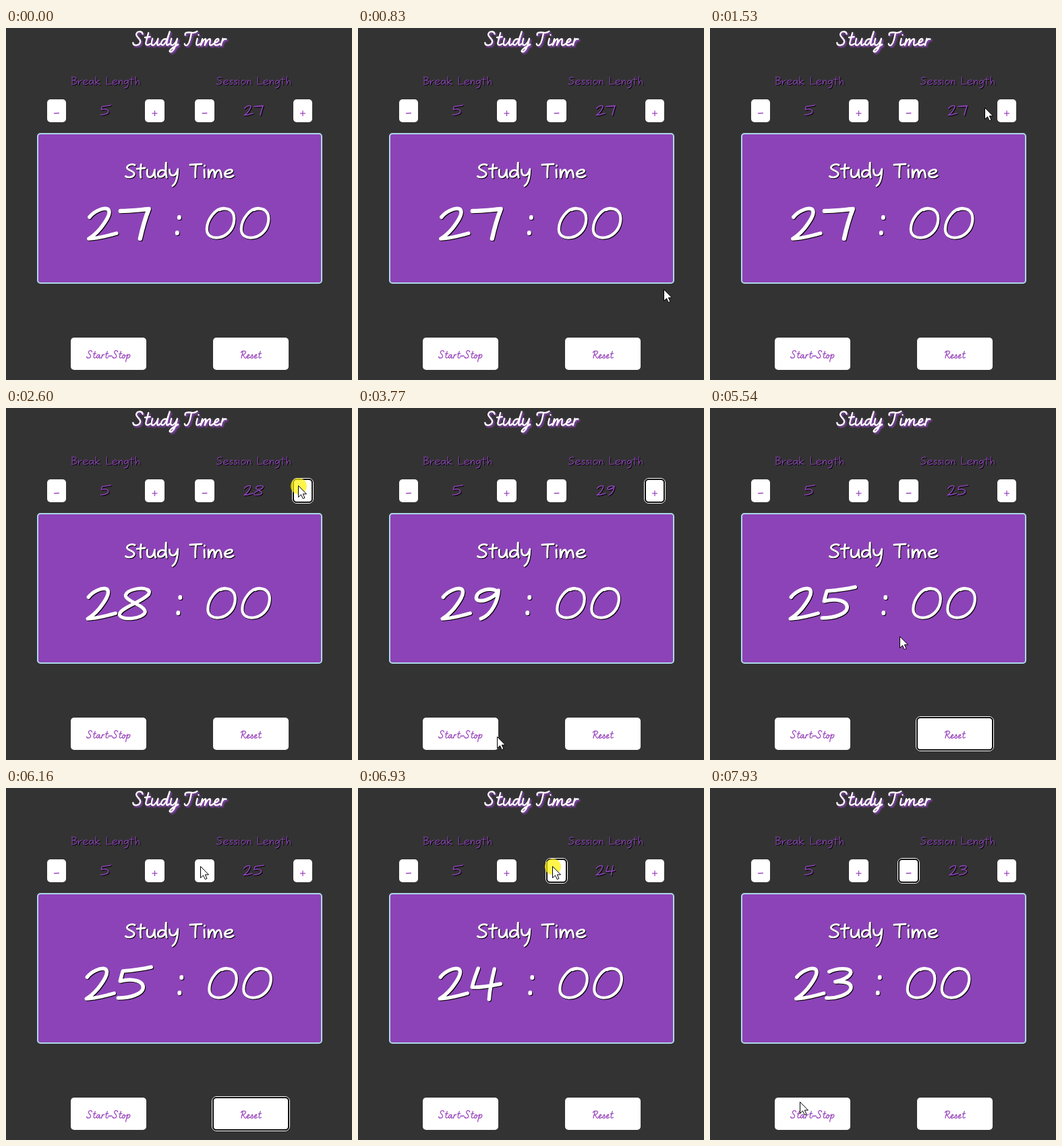
Write an HTML page that moves like this. It is 513 px wide and 523 px high and loops after 8 s.

```html
<!DOCTYPE html>
<html lang="en">
<head>
<meta charset="utf-8">
<title>Study Timer</title>
<style>
  html, body { margin: 0; width: 100%; height: 100%; overflow: hidden; background: #333; }
  svg { display: block; width: 513px; height: 523px; }
  .pen { fill: none; stroke-linecap: round; stroke-linejoin: round; }
  .pen text { fill: transparent; stroke: none; font-family: "Open Sans", sans-serif; text-anchor: middle; }
  .hard { filter: drop-shadow(1px 1px 0 #000); }
  .glow { filter: drop-shadow(2px 2px 1px #8c43b7); }
</style>
</head>
<body>
<svg id="stage" viewBox="0 0 513 523">
  <rect width="513" height="523" fill="#333"/>
  <rect x="47" y="157" width="421" height="222" rx="4" fill="#8c43b7" stroke="#add8e6" stroke-width="2"/>
  <g id="fixed"></g>
  <g id="minutes"></g>
  <g id="clock"></g>
  <g id="ring" fill="none"></g>
  <circle id="press" r="12" fill="#fff000" opacity=".7"/>
  <path id="cursor" d="M-.5 -.5V16.5L3.5 12.8L6.3 18.7L9 17.5L6.3 11.8H11.5Z" fill="#fff" stroke="#000"/>
</svg>
<script>
const PURPLE = '#8c43b7';
const $ = id => document.getElementById(id);

// Pen strokes per letter: [advance, path, relative weight]; capitals run from y 0 to the baseline at 50.
const hand = {
  ' ': [30, ''],
  ':': [13, 'M8 16v1M5 39v1', 1.4],
  0: [51, 'M30 3C16 1 3 20 3 34C3 54 38 50 43 24C46 8 36 0 22 5'],
  2: [46, 'M4 16C10 8 24 1 31 4C38 9 27 24 20 33C14 40 8 45 3 48C16 48 30 44 44 40', 1.3],
  3: [40, 'M6 8C18 2 38 2 38 9C37 16 24 21 15 23C30 22 40 25 38 33C35 42 16 48 2 47', 1.3],
  4: [53, 'M14 3C10 14 6 24 5 31C18 32 32 29 47 26M38 4C34 20 31 34 30 49', 1.3],
  5: [57, 'M53 1C40 4 24 6 11 7C9 13 8 18 7 22C26 17 42 22 41 32C40 41 22 47 4 47', 1.3],
  7: [50, 'M4 7C16 7 34 5 46 4C42 14 37 30 33 48', 1.5],
  8: [53, 'M46 6C40 0 16 4 13 13C12 22 42 28 42 38C40 48 6 52 4 42C4 32 36 24 47 12C49 8 48 6 46 5', 1.2],
  9: [45, 'M39 8C28 0 8 6 7 17C8 27 34 19 40 6C39 22 30 42 14 48', 1.3],
  B: [38, 'M7 4L6 48M3 5C20 0 34 6 30 14C26 21 16 22 8 24C24 22 36 28 33 37C28 46 16 48 5 48'],
  L: [34, 'M6 3C5 20 4 34 5 47C14 48 22 47 32 45'],
  S: [39, 'M34 6C22 0 6 8 8 16C10 25 34 26 32 37C29 48 10 50 3 44'],
  T: [43, 'M2 5L41 3M22 4C20 20 19 34 20 48'],
  a: [36, 'M27 26C16 18 4 28 4 38C6 52 24 46 28 26C27 36 28 44 33 48'],
  d: [39, 'M28 26C16 18 4 28 4 38C6 52 26 46 30 28C31 18 31 8 31-2C29 18 30 36 33 48'],
  e: [38, 'M5 36C20 36 32 30 30 24C25 18 6 24 5 36C6 50 24 50 34 42'],
  g: [34, 'M27 26C16 18 4 28 4 36C6 48 24 44 28 24C30 50 26 72 4 68'],
  h: [34, 'M6 0L6 48C8 34 14 24 20 25C28 27 27 38 28 48'],
  i: [16, 'M7 22L8 48M8 8v1'],
  k: [36, 'M6 2L6 48M28 22L8 36L32 48'],
  m: [55, 'M5 22L6 48C8 32 14 22 20 22C26 24 26 36 26 47C28 32 34 22 41 23C48 26 48 38 49 48'],
  n: [33, 'M5 22L6 48C8 32 14 22 20 22C28 24 27 38 28 48'],
  o: [34, 'M18 22C6 22 2 36 6 44C14 52 30 44 30 32C30 24 22 20 14 24'],
  r: [28, 'M5 22L6 48C6 34 14 22 25 24'],
  s: [26, 'M23 24C12 20 4 26 8 31C14 35 24 36 21 42C17 49 8 48 3 45'],
  t: [33, 'M16 4C14 20 12 36 15 48M2 19L29 16'],
  u: [36, 'M4 22C2 40 4 48 14 47C22 46 28 34 29 22C28 34 28 42 32 48'],
  y: [41, 'M4 22C4 38 10 44 20 40C26 36 30 28 32 20C32 44 26 70 14 76']
};

const script = {
  ' ': [18, ''],
  '-': [24, 'M1 36L23 35', 1.2],
  '+': [34, 'M5 36h24M17 24v24'],
  R: [38, 'M16 8L6 49M4 14C8 2 34 0 34 12C32 22 22 26 14 27C22 30 24 48 30 49C34 49 36 47 38 44'],
  S: [38, 'M36 10C34-2 16 0 14 12C14 22 30 26 28 38C24 52 4 52 3 40'],
  T: [40, 'M6 14C4 4 14 4 24 5C34 7 42 6 47 1M28 6C24 22 22 44 12 49C8 50 4 48 4 44'],
  a: [31, 'M22 29C10 22 2 38 4 45C8 54 18 42 23 28C20 38 18 48 23 49C26 49 29 46 31 44'],
  d: [32, 'M22 28C10 24 2 38 4 45C8 54 20 42 24 28L33 2C28 20 20 42 23 48C26 51 30 46 32 44'],
  e: [23, 'M5 40C14 38 20 32 17 27C12 24 4 34 3 42C4 52 14 50 23 44'],
  i: [17, 'M8 26C5 36 2 48 7 49C10 49 14 47 17 44M12 13v1'],
  m: [46, 'M8 27L2 49C8 36 14 26 19 27C22 30 18 40 16 49C22 36 28 26 34 27C38 30 30 46 35 49C39 50 42 47 46 44'],
  o: [26, 'M14 27C4 28 0 44 6 49C16 52 22 36 16 28C14 34 20 36 26 32'],
  p: [30, 'M9 24L-2 72M6 40C12 28 22 22 25 30C26 40 18 50 8 48'],
  r: [22, 'M3 49L9 26M6 38C10 30 15 25 21 28'],
  s: [24, 'M2 44C8 40 12 32 14 25C14 34 22 38 19 45C15 51 8 50 5 46'],
  t: [24, 'M18 6L9 40C8 50 16 50 24 44M6 22L24 20'],
  u: [34, 'M8 26C4 38 2 48 9 49C16 48 24 36 27 26C24 38 22 48 27 49C30 49 32 47 34 44'],
  y: [30, 'M7 26C3 38 2 48 9 49C16 48 24 36 27 26C24 44 16 70 4 72C-6 70 8 58 30 46']
};

// Draws a centred line of lettering, with the same words as selectable text.
function write(words, font, cx, top, scale, weight, color, effect = '') {
  let x = 0, strokes = '';
  for (const c of words) {
    const [advance, d, boldness = 1] = font[c];
    strokes += `<path transform="translate(${x})" d="${d}" stroke-width="${boldness * weight / scale}"/>`;
    x += advance;
  }
  return `<g class="pen ${effect}" stroke="${color}"><text x="${cx}" y="${top + 50 * scale}" font-size="${66 * scale}">${words}</text>
    <g transform="translate(${cx - x * scale / 2} ${top}) scale(${scale})">${strokes}</g></g>`;
}

const box = (x, y, w, h, grow, attrs) =>
  `<rect x="${x - grow}" y="${y - grow}" width="${w + 2 * grow}" height="${h + 2 * grow}" rx="${5 + grow}" ${attrs}/>`;

const buttons = {
  breakDown: [61, 106, 28, 34, '-'],
  breakUp: [206, 106, 29, 34, '+'],
  down: [280, 106, 29, 34, '-'],
  up: [426, 106, 28, 34, '+'],
  start: [96, 460, 112, 48, 'Start-Stop'],
  reset: [307, 460, 112, 48, 'Reset']
};

function drawButton([x, y, w, h, label]) {
  const sign = label.length === 1;
  return box(x, y, w, h, 0, 'fill="#fff"') +
    write(label, script, x + w / 2, sign ? 116 : 479, sign ? .3 : .235, 1.25, '#9a45bd');
}

const small = (value, cx) => write(value, hand, cx, 114.5, .31, 1.2, PURPLE, 'hard');

$('fixed').innerHTML =
  write('Study Timer', script, 257, 4.5, .432, 2.3, '#fff', 'glow') +
  write('Break Length', hand, 148, 72, .25, 1.05, PURPLE, 'hard') +
  write('Session Length', hand, 367.5, 72, .25, 1.05, PURPLE, 'hard') +
  write('Study Time', hand, 257.5, 201, .44, 2.9, '#fff', 'hard') +
  small('5', 148) +
  Object.values(buttons).map(drawButton).join('');

// Clock digits keep wide spaces around the colon.
const clockFont = { ...hand, ' ': [33, ''] };

const LOOP = 8000;
const values = [[0, 27], [2140, 28], [2770, 29], [4610, 25], [6700, 24], [7000, 23]];
const focus = [[0, ''], [1990, 'up'], [4460, 'reset'], [6620, 'down']];
const presses = [[1990, 2140], [2530, 2770], [4460, 4610], [6620, 6700], [6850, 7000]];

// [first step, last step, step count, bend x, bend y, end x, end y]
const moves = [
  [440, 590, 3, 456, 446, 463, 397],
  [760, 1530, 11, 276, 230, 408, 119],
  [1600, 1760, 3, 420, 118, 431, 116],
  [2450, 2530, 2, 433, 116, 434, 116],
  [2920, 3150, 4, 420, 200, 401, 309],
  [3300, 3770, 7, 320, 450, 207, 489],
  [4300, 4460, 3, 260, 485, 313, 481],
  [5160, 5930, 11, 262, 320, 281, 147],
  [6000, 6160, 3, 284, 125, 289, 117],
  [7080, 7390, 5, 250, 360, 160, 508],
  [7540, 7700, 3, 145, 480, 132, 458],
  [7930, 7930, 1, 133, 462, 134, 467]
];

const latest = (list, t) => list.filter(entry => entry[0] <= t).pop()[1];

function cursorAt(t) {
  let x = 452, y = 496;
  for (const [first, last, steps, bx, by, ex, ey] of moves) {
    if (t < first) break;
    const done = t >= last ? steps : 1 + Math.floor((t - first) / (last - first) * (steps - 1));
    const p = done / steps;
    const k = steps > 6 ? p * p * (3 - 2 * p) : p;
    const bend = (a, b, c) => (1 - k) ** 2 * a + 2 * k * (1 - k) * b + k * k * c;
    x = bend(x, bx, ex);
    y = bend(y, by, ey);
  }
  return [Math.round(x), Math.round(y)];
}

let shownValue, shownFocus;

function render(t) {
  const value = latest(values, t);
  if (value !== shownValue) {
    shownValue = value;
    $('minutes').innerHTML = small(`${value}`, 367.5);
    $('clock').innerHTML = write(`${value} : 00`, clockFont, 258.3, 265, 1, 4.2, '#fff', 'hard');
  }

  const target = latest(focus, t);
  if (target !== shownFocus) {
    shownFocus = target;
    const area = buttons[target];
    $('ring').innerHTML = area
      ? box(...area.slice(0, 4), 1.5, 'stroke="#fff"') + box(...area.slice(0, 4), 0, 'stroke="#101010" stroke-width="2"')
      : '';
  }

  const place = `translate(${cursorAt(t).join(' ')})`;
  $('cursor').setAttribute('transform', place);
  $('press').setAttribute('transform', place);
  $('cursor').style.display = t < 440 ? 'none' : '';
  $('press').style.display = presses.some(([on, off]) => t >= on && t < off) ? '' : 'none';
}

const begin = performance.now();
function tick() {
  render((performance.now() - begin) % LOOP);
  requestAnimationFrame(tick);
}
tick();
</script>
</body>
</html>
```
